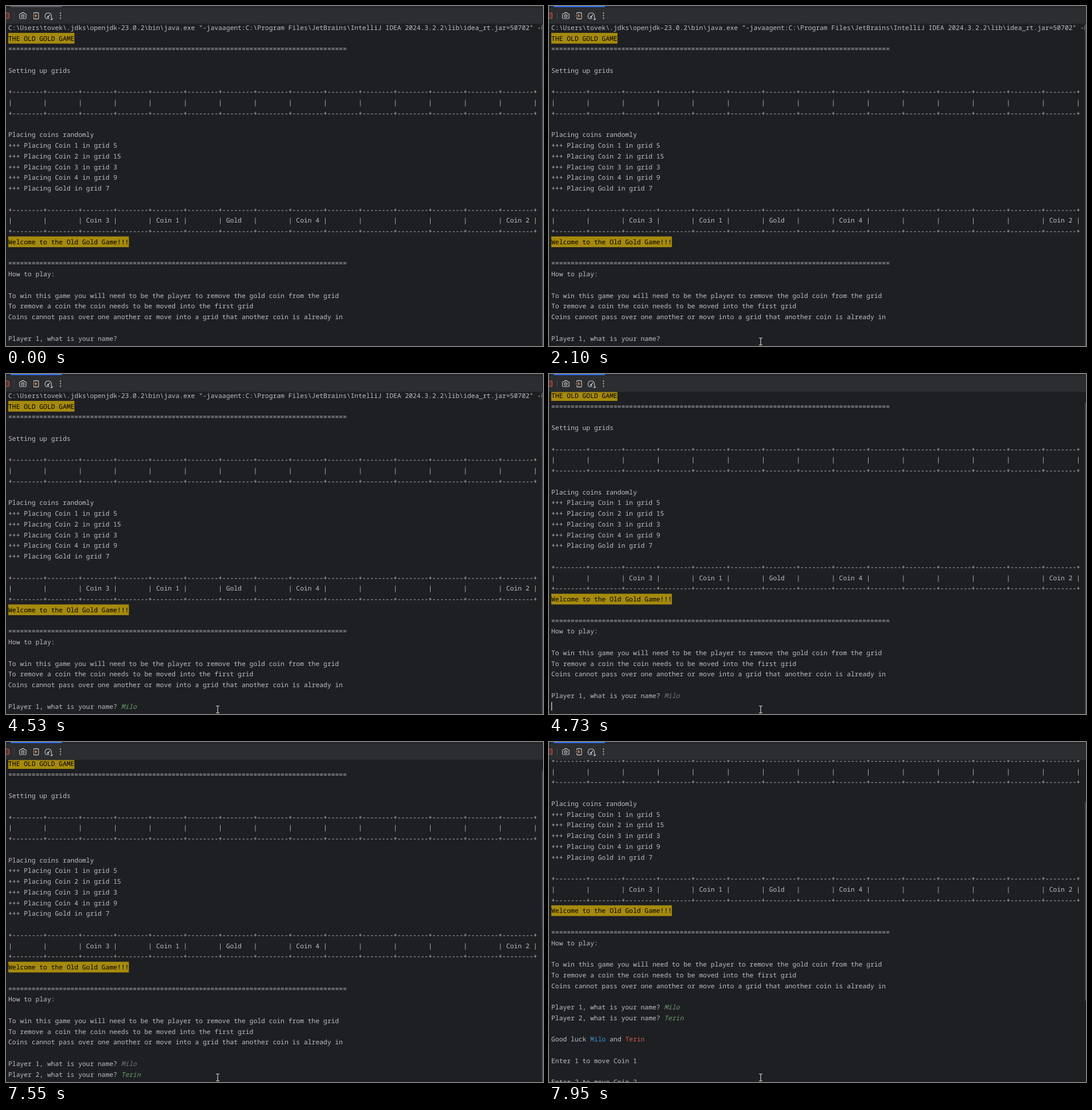
Animation of 941 by 595 pixels, one loop 8000 ms. Source, as an HTML page:

```html
<!DOCTYPE html>
<html lang="en">
<head>
<meta charset="utf-8">
<title>Console game</title>
<style>
  html, body { margin: 0; width: 100%; height: 100%; overflow: hidden; background: #1e1f22; }
  svg { display: block; width: 941px; height: 595px; }
  text {
    font: 11.36px "Noto Sans Mono", "DejaVu Sans Mono", monospace;
    font-variant-ligatures: none;
    text-rendering: geometricPrecision;
    white-space: pre;
    fill: #bcbec4;
  }
  .input { font-style: italic; }
  .icon { fill: none; stroke: #ced0d6; stroke-width: 1.1; stroke-linejoin: round; stroke-linecap: round; }
</style>
</head>
<body>
<svg viewBox="0 0 941 595" xmlns="http://www.w3.org/2000/svg">
  <defs><clipPath id="view"><rect y="31.5" width="941" height="563.5"/></clipPath></defs>
  <rect width="941" height="595" fill="#1e1f22"/>
  <g clip-path="url(#view)">
    <g id="rows"></g>
    <rect id="caret" width="1.3" height="15" fill="#ced0d6"/>
  </g>
  <rect id="thumb" x="939" width="2" fill="#46474a"/>

  <rect width="941" height="31" fill="#2b2d30"/>
  <rect y="1.5" width="941" height="1" fill="#1e1f22"/>
  <rect id="tab" x="8" y="0" width="90" height="2" rx="0.8"/>
  <rect x="-5" y="12.2" width="10.5" height="9.6" rx="1.6" fill="#5e3030" stroke="#c4604a" stroke-width="1.1"/>
  <path d="M14.5 10V24.5" stroke="#43454a"/>
  <g class="icon">
    <path d="M25 13.5h1.6l1.2-1.9h3.4l1.2 1.9H34q1.2 0 1.2 1.2v6.1q0 1.2-1.2 1.2h-9q-1.2 0-1.2-1.2v-6.1q0-1.2 1.2-1.2z"/>
    <circle cx="29.5" cy="17.6" r="2.2"/>
    <path d="M48.6 14v-1.2q0-1.2 1.2-1.2h6q1.2 0 1.2 1.2v8.6q0 1.2-1.2 1.2h-6q-1.2 0-1.2-1.2V20"/>
    <path d="M47 17h6.5m-2.4-2.5 2.5 2.5-2.5 2.5" stroke="#d08a5c"/>
    <path d="M70.2 22q-2-1.7-2-4.2a5.8 5.8 0 0 1 11.6 0q0 1.5-.7 2.6M70.2 22h5.5M74 18.8l2.8-3.2"/>
    <circle cx="73.6" cy="19" r="1.1"/>
  </g>
  <path d="M81.5 20.2v4h-4z" fill="#ced0d6"/>
  <g fill="#ced0d6">
    <circle cx="95.5" cy="12.7" r="1.1"/><circle cx="95.5" cy="17" r="1.1"/><circle cx="95.5" cy="21.3" r="1.1"/>
  </g>
  <path id="mouse" d="M-3-6h2q1 0 1 1q0-1 1-1h2M0-5V5M-3 6h2q1 0 1-1q0 1 1 1h2" fill="none" stroke="#e6e6e6" stroke-width="1.1"/>
</svg>
<script>
const LOOP = 8000, CHAR = 6.817, LINE = 18.75, LEFT = 4, TOP = 28.3;
const VIEW_TOP = 32, VIEW_H = 563;
const NAMES = ["Milo", "Terin"];
const KEYS = [[2520, 3420, 3620, 4020], [5740, 6240, 6540, 6750, 7050]];
const ENTER = [4730, 7750], PROMPT2 = 4930, OUTPUT = 7950, FOCUS = 1210;
const CARET_ON = [[FOCUS, 2100], [2520, 3120], [3420, 4530], [4730, 5540], [5740, 7550], [7750, LOOP]];

const $ = id => document.getElementById(id);
const set = (el, attrs) => { for (const k in attrs) el.setAttribute(k, attrs[k]); };
function add(parent, tag, attrs, text) {
  const el = document.createElementNS("http://www.w3.org/2000/svg", tag);
  set(el, attrs);
  if (text) el.textContent = text;
  return parent.appendChild(el);
}

const edge = "+" + "--------+".repeat(15);
const cells = (coins = {}) =>
  "|" + Array.from({ length: 15 }, (_, i) => " " + (coins[i + 1] || "").padEnd(7) + "|").join("");
const rule = "=".repeat(87);
const ask = n => `Player ${n}, what is your name? `;
const spots = [["Coin 1", 5], ["Coin 2", 15], ["Coin 3", 3], ["Coin 4", 9], ["Gold", 7]];
const placed = Object.fromEntries(spots.map(([coin, cell]) => [cell, coin]));

const lines = [
  String.raw`C:\Users\tovek\.jdks\openjdk-23.0.2\bin\java.exe "-javaagent:C:\Program Files\JetBrains\IntelliJ IDEA 2024.3.2.2\lib\idea_rt.jar=50702" -Dfile`,
  "THE OLD GOLD GAME", rule, "",
  "Setting up grids", "",
  edge, cells(), edge, "",
  "Placing coins randomly",
  ...spots.map(([coin, cell]) => `+++ Placing ${coin} in grid ${cell}`), "",
  edge, cells(placed), edge,
  "Welcome to the Old Gold Game!!!", "",
  rule, "How to play:", "",
  "To win this game you will need to be the player to remove the gold coin from the grid",
  "To remove a coin the coin needs to be moved into the first grid",
  "Coins cannot pass over one another or move into a grid that another coin is already in", "",
  ask(1), ask(2), "",
  "Good luck ", "",
  "Enter 1 to move Coin 1", "",
  "Enter 2 to move Coin 2"
];
const MARKED = [1, 20], ASK_ROW = 29, LUCK_ROW = 32;

const rows = $("rows");
const texts = lines.map((line, i) => {
  const marked = MARKED.includes(i);
  const y = TOP + i * LINE;
  if (marked) add(rows, "rect", { x: LEFT, y, width: line.length * CHAR, height: LINE, fill: "#a68a0d" });
  const el = add(rows, "text", { x: LEFT, y: y + 13.6 });
  add(el, "tspan", marked ? { style: "fill:#000" } : {}, line);
  return el;
});
const inputs = [0, 1].map(i => add(texts[ASK_ROW + i], "tspan", { class: "input" }));
add(texts[LUCK_ROW], "tspan", { style: "fill:#3993d4" }, NAMES[0]);
add(texts[LUCK_ROW], "tspan", {}, " and ");
add(texts[LUCK_ROW], "tspan", { style: "fill:#d15b50" }, NAMES[1]);

function inputColor(player, t) {
  if (t >= OUTPUT) return "#6a9a72";
  if (t >= ENTER[1]) return "#62877f";
  return t >= ENTER[player] ? "#747678" : "#64a06c";
}

function draw(t) {
  const entered = ENTER.filter(e => t >= e).length;
  const done = t >= OUTPUT;
  const scroll = done ? 117.5 : entered * LINE;
  set(rows, { transform: `translate(0 ${-scroll})` });

  const typed = KEYS.map(keys => keys.filter(k => t >= k).length);
  inputs.forEach((el, i) => {
    el.textContent = NAMES[i].slice(0, typed[i]);
    el.style.fill = inputColor(i, t);
  });
  texts.forEach((el, i) => {
    const shown = i <= ASK_ROW || (i === ASK_ROW + 1 ? t >= PROMPT2 : done);
    el.style.display = shown ? "" : "none";
  });

  const atPrompt = entered === 0 || (entered === 1 && t >= PROMPT2);
  const col = atPrompt ? ask(1).length + typed[entered] : 0;
  const lit = !done && CARET_ON.some(([a, b]) => t >= a && t < b);
  set($("caret"), {
    x: LEFT + col * CHAR,
    y: TOP + (ASK_ROW + entered) * LINE - scroll + 1.9,
    visibility: lit ? "visible" : "hidden"
  });

  const content = done ? 911 : VIEW_H + scroll;
  const size = VIEW_H * VIEW_H / content;
  set($("thumb"), { y: VIEW_TOP + scroll * VIEW_H / content, height: size });
  set($("tab"), { fill: t >= FOCUS ? "#3574f0" : "#5a5d63" });

  // The pointer comes in from below in 100 ms steps.
  const step = Math.min(1, Math.max(0, Math.floor((t - 400) / 100) / 7));
  const left = (1 - step) ** 2;
  set($("mouse"), { transform: `translate(${371 + 5 * left} ${587 + 16 * left})` });
}

const start = performance.now();
function tick() {
  draw((performance.now() - start) % LOOP);
  requestAnimationFrame(tick);
}
tick();
</script>
</body>
</html>
```
